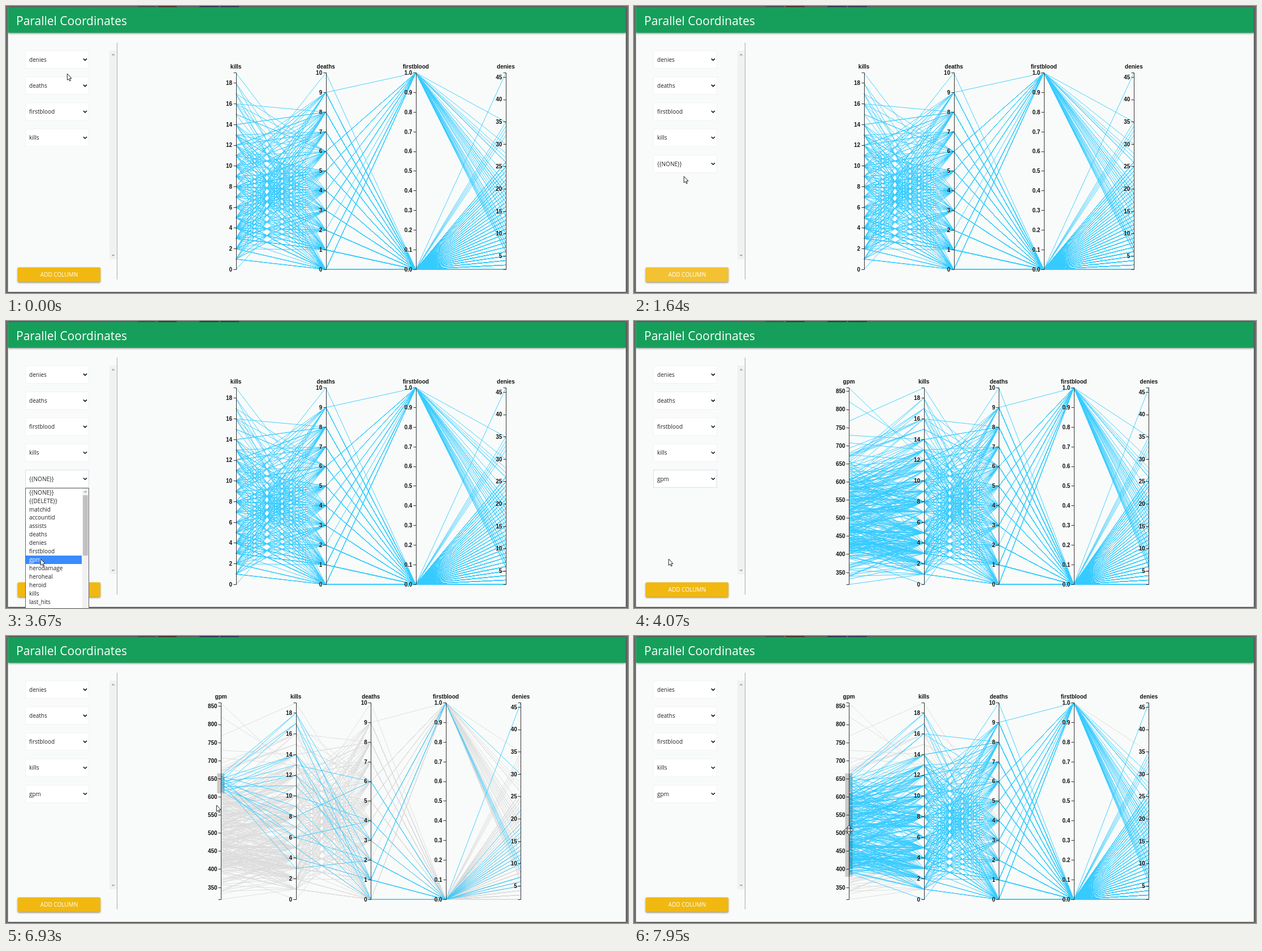
Animation of 1100 by 509 pixels, one loop 8000 ms. Source, as an HTML page with a canvas:

```html
<!DOCTYPE html>
<html lang="en">
<head>
<meta charset="utf-8">
<title>Parallel Coordinates</title>
<style>
  html, body { margin: 0; width: 100%; height: 100%; overflow: hidden; background: #6b6b6b; }
  canvas { display: block; }
</style>
</head>
<body>
<canvas id="stage" width="1100" height="509"></canvas>
<script>
const ctx = document.getElementById('stage').getContext('2d');
const LOOP = 8000, TICK = 203.6;
const UI = '"Open Sans", "Noto Sans", sans-serif';
const CHART = '"Liberation Sans", Arial, sans-serif';
const TOP = 118.5, BOTTOM = 467.3;

const AXES = {
  gpm:        { min: 317, max: 860, from: 350, step: 50, count: 11 },
  kills:      { min: 0, max: 19, from: 0, step: 2, count: 10 },
  deaths:     { min: 0, max: 10, from: 0, step: 1, count: 11 },
  firstblood: { min: 0, max: 1, from: 0, step: 0.1, count: 11, digits: 1 },
  denies:     { min: 2, max: 46, from: 5, step: 5, count: 9 }
};
const OPTIONS = ['{{NONE}}', '{{DELETE}}', 'matchid', 'accountid', 'assists', 'deaths', 'denies',
  'firstblood', 'gpm', 'herodamage', 'heroheal', 'heroid', 'kills', 'last_hits'];

// Ticks at which the state of the page changes.
const ADDED = 7, OPENED = 12, CHOSEN = 20, BRUSH_START = 30, BRUSHED = 34, REBRUSHED = 38;

// Pointer path: tick, x, y.
const PATH = [[0, 108, 120], [6, 97, 480], [7, 95, 478], [8, 88, 302], [10, 86, 282], [11, 85, 281],
  [12, 78, 372], [15, 61, 422], [21, 61, 422], [26, 416, 262], [27, 408, 257], [28, 377, 242],
  [29, 377, 242], [32, 378, 279], [33, 378, 279], [34, 372, 300], [35, 367, 338], [37, 378, 427], [39, 380, 344]];
const PRESSED = [6, 11, 17, 28, 29, 30, 31, 32, 33, 35, 36, 37];

function makeRows() {
  let seed = 20;
  const rnd = () => {
    seed = (seed + 0x6D2B79F5) | 0;
    let t = Math.imul(seed ^ (seed >>> 15), 1 | seed);
    t = (t + Math.imul(t ^ (t >>> 7), 61 | t)) ^ t;
    return ((t ^ (t >>> 14)) >>> 0) / 4294967296;
  };
  const row = (gpm, [kills, deaths, firstblood, denies]) => ({ gpm, kills, deaths, firstblood, denies });
  // Rows inside the first brush, then the extremes of each axis.
  const rows = [[18,1,0,22], [18,3,1,30], [17,0,0,16], [17,2,0,14], [14,3,1,9], [14,1,0,46], [14,0,0,12],
    [13,6,0,18], [12,3,0,11], [12,1,1,8], [11,2,0,7], [10,4,0,13], [9,1,0,19], [8,0,0,10], [8,6,0,17],
    [7,1,1,10], [6,4,0,6], [6,2,0,15], [5,0,0,13], [4,1,0,7], [3,2,0,5]
  ].map((values, i) => row(660 - (i * 17 % 46), values));
  rows.push(row(768, [19,4,0,12]), row(860, [12,2,0,9]), row(822, [13,3,1,35]), row(450, [8,10,0,8]),
    row(420, [9,9,1,12]), row(317, [1,4,0,2]), row(390, [0,5,0,4]), row(480, [4,9,0,35]),
    row(520, [7,5,0,34]), row(560, [9,3,0,33]), row(440, [3,2,0,32]));
  while (rows.length < 300) {
    const kills = Math.round(1 + 17 * (rnd() * 0.65 + rnd() * 0.35) ** 1.5);
    const gpm = Math.round(385 + 16 * kills + 130 * (rnd() + rnd() - 0.95));
    const deaths = Math.floor(9.4 * rnd() ** 1.15);
    const firstblood = deaths < 7 && rnd() < 0.17 ? 1 : 0;
    const denies = firstblood ? 6 + Math.floor(23 * rnd()) : 2 + Math.floor(25 * rnd() ** 1.6);
    if (gpm > 330 && gpm < 800 && (gpm < 610 || gpm > 666))
      rows.push(row(gpm, [kills, deaths, firstblood, denies]));
  }
  return rows;
}
const ROWS = makeRows();

function rect(x, y, w, h, fill) {
  ctx.fillStyle = fill;
  ctx.fillRect(x, y, w, h);
}
function frame(x, y, w, h, color) {
  ctx.strokeStyle = color;
  ctx.lineWidth = 1;
  ctx.strokeRect(x, y, w, h);
}
function text(s, x, y, font, fill, align = 'left') {
  ctx.font = font;
  ctx.textAlign = align;
  ctx.fillStyle = fill;
  ctx.fillText(s, x, y);
}
function trace(points, close) {
  ctx.beginPath();
  points.forEach(([x, y]) => ctx.lineTo(x, y));
  if (close) ctx.closePath();
}
function line(points, color, width = 1) {
  trace(points);
  ctx.strokeStyle = color;
  ctx.lineWidth = width;
  ctx.stroke();
}
function triangle(x, y, dir) {
  trace([[x - 3, y + 1.5 * dir], [x + 3, y + 1.5 * dir], [x, y - 1.5 * dir]], true);
  ctx.fillStyle = '#a3a3a3';
  ctx.fill();
}
function shadow(color, blur, dy) {
  ctx.shadowColor = color;
  ctx.shadowBlur = blur;
  ctx.shadowOffsetY = dy;
}
const noShadow = () => shadow('transparent', 0, 0);

function drawPage() {
  rect(0, 0, 1100, 509, '#6b6b6b');
  rect(233, 0, 32, 2, '#55505a');
  rect(269, 0, 33, 2, '#5c3535');
  rect(342, 0, 34, 2, '#3c3a60');
  rect(379, 0, 33, 2, '#3f3a62');
  shadow('rgba(0,0,0,.35)', 3, 0);
  rect(3.5, 2, 1092.5, 505, '#f9fbfa');
  shadow('rgba(0,0,0,.4)', 3, 1);
  rect(3.5, 2, 1092.5, 45.5, '#169f5a');
  noShadow();
  text('Parallel Coordinates', 18, 34, `21px ${UI}`, '#fff');
}

function drawSelect(label, y, focused) {
  rect(34.5, y - 15.5, 112, 31, '#fff');
  frame(34.5, y - 15.5, 112, 31, focused ? '#cfe0ee' : '#f0f2f2');
  text(label, 41, y + 3.7, `10px ${UI}`, '#222');
  line([[136.8, y - 1.6], [139.9, y + 1.4], [143, y - 1.6]], '#111', 1.6);
}

function drawSidebar(tick) {
  rect(183, 79, 12.5, 370, '#f0f1f1');
  triangle(189.5, 86, 1);
  triangle(189.5, 442.5, -1);
  rect(196, 65, 1, 420, '#a9abab');

  const labels = ['denies', 'deaths', 'firstblood', 'kills'];
  if (tick >= ADDED) labels.push(tick < CHOSEN ? OPTIONS[0] : 'gpm');
  labels.forEach((label, i) => drawSelect(label, 95 + 46.2 * i, i === 4 && tick >= 11 && tick < 28));

  shadow('rgba(0,0,0,.4)', 3, 1.5);
  ctx.beginPath();
  ctx.roundRect(20.5, 463.5, 146.5, 26, 2);
  ctx.fillStyle = tick >= 5 && tick < 11 ? '#f3c232' : '#f1b811';
  ctx.fill();
  noShadow();
  text('ADD COLUMN', 94, 480, `500 10px ${UI}`, '#fff', 'center');
}

function drawDropdown(pointerY) {
  rect(34.5, 296, 112.5, 214, '#fff');
  frame(34.5, 296.5, 112, 220, '#666');
  rect(135, 297, 11, 212, '#f1f1f1');
  rect(136, 309, 9, 107, '#c1c1c1');
  triangle(140.5, 302.5, 1);
  const hovered = Math.floor((pointerY - 296.5) / 14.93);
  OPTIONS.forEach((option, i) => {
    const y = 304 + 14.93 * i;
    if (i === hovered) rect(35, Math.round(y - 7.5), 99, 15, '#3a8bfd');
    text(option, 41, y + 3.7, `10px ${UI}`, i === hovered ? '#fff' : '#222');
  });
}

const scaleY = (name, v) => BOTTOM - (v - AXES[name].min) / (AXES[name].max - AXES[name].min) * (BOTTOM - TOP);

function drawAxis(name, x) {
  const { from, step, count, digits = 0 } = AXES[name];
  const label = (s, lx, ly, align) => {
    text(s, lx, ly + 1, `bold 10px ${CHART}`, '#fff', align);
    text(s, lx, ly, `bold 10px ${CHART}`, '#111', align);
  };
  const left = Math.round(x) + 0.5;
  line([[left - 5, TOP], [left, TOP], [left, 467.5], [left - 5, 467.5]], '#333');
  for (let i = 0; i < count; i++) {
    const v = from + i * step, y = scaleY(name, v);
    line([[left - 5, Math.round(y - 0.5) + 0.5], [left, Math.round(y - 0.5) + 0.5]], '#333');
    label(v.toFixed(digits), x - 6.5, y + 3.4, 'right');
  }
  label(name, x, 111.3, 'center');
}

function drawChart(tick, pointerY) {
  const names = Object.keys(AXES).slice(tick < CHOSEN ? 1 : 0);
  const axisX = i => 247.5 + (i + 1) * 795.5 / (names.length + 1);
  const low = tick >= REBRUSHED ? 380 : 610;
  const selected = row => tick < BRUSHED || (row.gpm >= low && row.gpm <= 666);
  const drawRow = (row, color) => line(names.map((n, i) => [axisX(i), scaleY(n, row[n])]), color, 0.9);

  ROWS.filter(row => !selected(row)).forEach(row => drawRow(row, '#dcdcdc'));
  ROWS.filter(selected).forEach(row => drawRow(row, '#36cbff'));
  names.forEach((name, i) => drawAxis(name, axisX(i)));

  if (tick >= BRUSH_START) {
    const end = tick < 33 ? pointerY : tick < 36 ? 279 : tick < 38 ? pointerY : 427;
    rect(373.5, 243.5, 13, end - 243.5, 'rgba(0,0,0,.2)');
  }
}

function outlined(points) {
  trace(points, true);
  ctx.fillStyle = '#fff';
  ctx.fill();
  ctx.strokeStyle = '#222';
  ctx.lineWidth = 1;
  ctx.stroke();
}
// Arrow with one head for each of the given number of directions.
function drawHeads(count) {
  const points = [];
  for (let i = 0; i < count; i++) {
    const a = i * 2 * Math.PI / count, c = Math.cos(a), s = Math.sin(a);
    [[-1.2, -1.2], [-1.2, -4.2], [-3.2, -4.2], [0, -8], [3.2, -4.2], [1.2, -4.2], [1.2, -1.2]]
      .forEach(([x, y]) => points.push([x * c - y * s, x * s + y * c]));
  }
  outlined(points);
}

function pointerAt(tick) {
  const next = Math.max(1, PATH.findIndex(p => p[0] >= tick));
  const [t0, x0, y0] = PATH[next - 1], [t1, x1, y1] = PATH[next];
  const p = (tick - t0) / (t1 - t0);
  return [x0 + (x1 - x0) * p, y0 + (y1 - y0) * p];
}

function drawPointer(tick, x, y) {
  ctx.save();
  ctx.translate(x, y);
  if (PRESSED.includes(tick)) {
    ctx.beginPath();
    ctx.arc(0, 0, 8.6, 0, 2 * Math.PI);
    ctx.fillStyle = 'rgba(255,245,50,.72)';
    ctx.fill();
  }
  if (tick >= 38) drawHeads(4);
  else if (tick >= 36) drawHeads(2);
  else if (tick >= 28 && tick < 34) {
    line([[-8, 0], [8, 0]], '#222');
    line([[0, -8], [0, 8]], '#222');
  } else {
    outlined([[0.3, 0], [0.3, 11.4], [2.8, 9.1], [4.6, 13], [6.4, 12.2], [4.6, 8.5], [8, 8.3]]);
  }
  ctx.restore();
}

function draw(tick) {
  const [x, y] = pointerAt(tick);
  drawPage();
  drawSidebar(tick);
  drawChart(tick, y);
  if (tick >= OPENED && tick < CHOSEN) drawDropdown(y);
  drawPointer(tick, x, y);
}

// The screen refreshes in steps, so redraw only when the step changes.
let shown = -1;
const start = performance.now();
function loop() {
  const time = (performance.now() - start) % LOOP;
  const tick = Math.min(39, Math.floor((time + 5) / TICK));
  if (tick !== shown) draw(shown = tick);
  requestAnimationFrame(loop);
}
loop();
</script>
</body>
</html>
```
